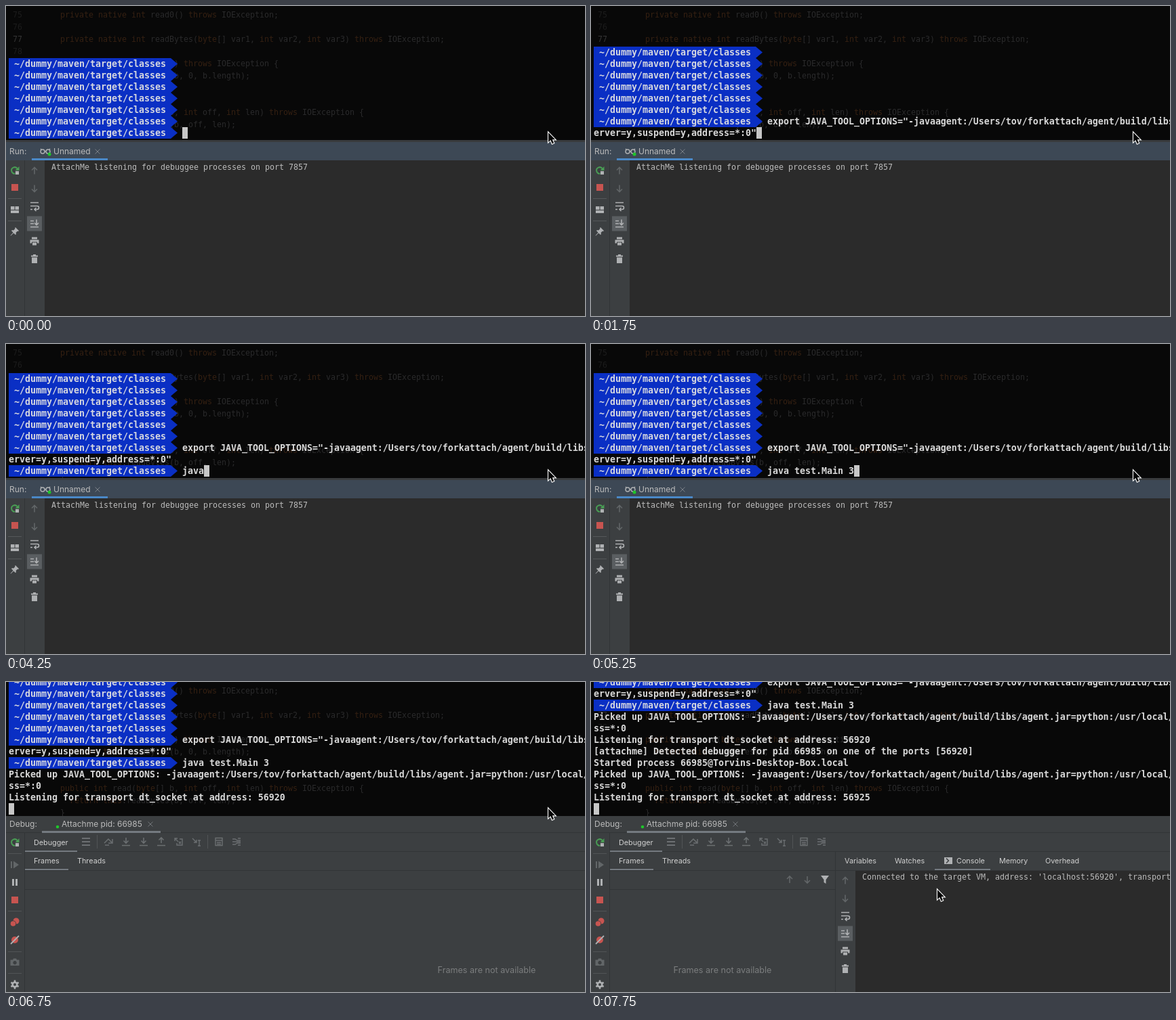
Recreate the animation shown at these times as an HTML page with a canvas. Size 854 by 458 pixels, loop 8000 ms.

```html
<!DOCTYPE html>
<html lang="en">
<head>
<meta charset="utf-8">
<title>Debugger attach</title>
<style>
html, body { margin: 0; width: 100%; height: 100%; overflow: hidden; background: #2b2b2b; }
canvas { display: block; }
</style>
</head>
<body>
<canvas id="stage" width="854" height="458"></canvas>
<script>
const ctx = document.getElementById('stage').getContext('2d');
const LOOP = 8000, ROW = 17, LAST_ROW = 179, CHAR = 8;
const MONO = '"DejaVu Sans Mono", monospace', UI = 'Inter, sans-serif';
const PANEL = '#3c3f41', CONSOLE = '#2b2b2b', LINE = '#323537', ICON = '#afb1b3',
      DIM = '#626668', GREEN = '#499c54', RED = '#c75450', LABEL = '#bbbbbb';

function rect(x, y, w, h, color) {
  ctx.fillStyle = color;
  ctx.fillRect(x, y, w, h);
}

function text(str, x, y, color, font, align = 'left') {
  ctx.font = font;
  ctx.fillStyle = color;
  ctx.textAlign = align;
  ctx.fillText(str, x, y);
}

const header = (str, x, y) => text(str, x, y + 4.3, LABEL, '12px ' + UI);
const tab = (str, x, y) => text(str, x, y + 4, '#d0d0d0', '10.8px ' + UI);
const log = (str, x, y) => text(str, x, y + 4, '#bbbbbb', '11.63px ' + MONO);

// Icon paths around their own centre: [path, stroke width or 0 for fill]
const ICONS = {
  up: ['M0 5V-5M-4-1L0-5L4-1', 1.6],
  down: ['M0-5V5M-4 1L0 5L4 1', 1.6],
  wrap: ['M-6-5H6M-6 0H4A2.5 2.5 0 0 1 4 5H0M2.5 2.5L0 5L2.5 7.5M-6 5H-3', 1.6],
  scrollEnd: ['M-6-4H-1M-6 0H-1M-6 5H6M3-6V2M0-1L3 2L6-1', 1.6],
  print: ['M-4-6H4V-3H-4ZM-6.5-2H6.5V3H4V1H-4V3H-6.5ZM-3 2H3V6H-3Z', 0],
  trash: ['M-5-5H-2V-6.5H2V-5H5V-3H-5ZM-4-2H4V6.5H-4Z', 0],
  layout: ['M-6-5H-.5V0H-6ZM.5-5H6V0H.5ZM-6 1H6V5H-6Z', 0],
  pin: ['M1-6L6-1L5 0L4-.5L1.5 2L2 4L1 5L-1.8 2.4L-6 6.4L-6.4 6L-2.4 1.8L-5-1L-4-2L-2-1.5L.5-4L0-5Z', 0],
  filter: ['M-6-6H6L1.5 0V6L-1.5 4V0Z', 0],
  resume: ['M-6-5H-4V5H-6ZM-2-5.5L6 0L-2 5.5Z', 0],
  pause: ['M-4-5H-1V5H-4ZM1-5H4V5H1Z', 0],
  camera: ['M-6.5-3.5H-3L-2-5.5H2L3-3.5H6.5V5H-6.5ZM0-2A2.7 2.7 0 1 0 .1-2Z', 0],
  teeth: ['M0-6.5V6.5M-5.6-3.2L5.6 3.2M-5.6 3.2L5.6-3.2', 2.6],
  menu: ['M-6-5H6M-6 0H6M-6 5H6', 1.6],
  over: ['M-6 2L0-4L5 1M6-4V2H0M-5 5H1', 1.5],
  into: ['M0-6V2M-3.5-1.5L0 2L3.5-1.5M-6 5.5H6', 1.6],
  out: ['M0 2V-6M-3.5-2.5L0-6L3.5-2.5M-6 5.5H6', 1.6],
  drop: ['M-6-5L-1 0M-6-1V-5H-2M-3 2V5H5V-4H1M0 0L3 3M3 0L0 3', 1.4],
  toCursor: ['M-6-5L0 1M0-3V1H-4M2-2H6M4-2V6M2 6H6', 1.4],
  calc: ['M-5-5.5H5V5.5H-5ZM-5-2H5M-3 1H3M-3 3.5H3', 1.4],
  trace: ['M-6-4H-2L1-2H6M-6 0H6M-6 4H-2L1 2H6M2-5H6M2 5H6', 1.4],
  glasses: ['M-7-3L-6-4M7-3L6-4M-1 0H1M-7 0A3 3 0 1 0-1 0A3 3 0 1 0-7 0M1 0A3 3 0 1 0 7 0A3 3 0 1 0 1 0', 1.4],
  close: ['M-3.5-3.5L3.5 3.5M3.5-3.5L-3.5 3.5', 1],
  rerun: ['M3.8-2.6A4.7 4.7 0 1 0 .5 4.6', 2],
  rerunHead: ['M6.5-6V0H.5Z', 0],
  prompt: ['M-6-5H6V5H-6ZM-3.5-3L-.5 0L-3.5 3L-2.5 4L1.5 0L-2.5-4Z', 0],
  slash: ['M-6 6L6-6', 1.8],
  pointer: ['M0 0V14L3.3 11L5.6 16.5L8 15.5L5.7 10.3H10Z', 0]
};
for (const key in ICONS) ICONS[key][0] = new Path2D(ICONS[key][0]);

function icon(name, x, y, color = ICON) {
  const [path, width] = ICONS[name];
  ctx.save();
  ctx.translate(x, y);
  ctx.fillStyle = ctx.strokeStyle = color;
  ctx.lineWidth = width;
  if (width) ctx.stroke(path); else ctx.fill(path, 'evenodd');
  ctx.restore();
}

function dot(x, y, r, color) {
  ctx.fillStyle = color;
  ctx.beginPath();
  ctx.arc(x, y, r, 0, 7);
  ctx.fill();
}

function rerun(x, y) {
  icon('rerun', x, y, GREEN);
  icon('rerunHead', x, y, GREEN);
  rect(x + 1, y + 1, 5, 5, ICON);
}

function pointer(x, y) {
  ctx.save();
  ctx.translate(x, y);
  ctx.strokeStyle = '#fff';
  ctx.lineWidth = 2.2;
  ctx.stroke(ICONS.pointer[0]);
  ctx.restore();
  icon('pointer', x, y, '#000');
}

// Faint editor behind the translucent terminal
const CODE = [
  [80, 13, 'private native int read0() throws IOException;'],
  [80, 49, 'private native int readBytes(byte[] var1, int var2, int var3) throws IOException;'],
  [80, 85, 'public int read(byte[] b) throws IOException {'],
  [94, 103, 'return this.readBytes(b, 0, b.length);'],
  [80, 121, '}'],
  [80, 157, 'public int read(byte[] b, int off, int len) throws IOException {'],
  [94, 175, 'return this.readBytes(b, off, len);'],
  [80, 193, '}']
];

function editor() {
  const font = '11.63px ' + MONO;
  rect(0, 0, 854, 198, '#080808');
  for (let i = 0; i < 4; i++)
    text(75 + i, 10, 17 + i * 18, i === 2 ? '#343434' : '#1c1c1c', font);
  for (const [x, y, line] of CODE)
    for (const m of line.matchAll(/\w+|[^\w\s]+/g)) {
      const keyword = /^(private|native|public|int|byte|throws|return|this)$/.test(m[0]);
      text(m[0], x + m.index * 7, y + 4, keyword ? '#352012' : '#2a2a2b', font);
    }
}

const AGENT = '-javaagent:/Users/tov/forkattach/agent/build/libs/agent.jar=python:/usr/local/';
const EXPORT = 'export JAVA_TOOL_OPTIONS="' + AGENT;
const PICKED = ['Picked up JAVA_TOOL_OPTIONS: ' + AGENT, 'ss=*:0'];
const prompt = command => ({ prompt: true, text: command });
const output = line => ({ prompt: false, text: line });

function typed(str, t, steps) {
  let count = 0;
  for (const [start, n] of steps) if (t >= start) count = n;
  return str.slice(0, count);
}

function terminalRows(t) {
  const rows = Array.from({ length: 6 }, () => prompt(''));
  const print = (...lines) => rows.push(...lines.map(output));
  if (t < 1750) {
    rows.push(prompt(typed(EXPORT, t, [[750, 1], [1000, 3], [1250, 4], [1500, 6]])));
    return rows;
  }
  rows.push(prompt(EXPORT));
  print('erver=y,suspend=y,address=*:0"');
  if (t >= 3000) rows.push(prompt(typed('java test.Main 3', t, [[4000, 3], [4250, 4], [5250, 16]])));
  if (t >= 6500) print(...PICKED, 'Listening for transport dt_socket at address: 56920');
  if (t >= 7000) print('[attachme] Detected debugger for pid 66985 on one of the ports [56920]',
    'Started process 66985@Torvins-Desktop-Box.local', ...PICKED);
  if (t >= 7500) print('Listening for transport dt_socket at address: 56925');
  if (t >= 6500) print('');
  return rows;
}

function terminal(t) {
  const rows = terminalRows(t), font = 'bold 13.29px ' + MONO;
  editor();
  rows.forEach((row, i) => {
    const top = LAST_ROW - (rows.length - 1 - i) * ROW;
    const x = row.prompt ? 260 : 4;
    if (row.prompt) {
      ctx.fillStyle = '#0a2fc4';
      ctx.beginPath();
      ctx.moveTo(4, top);
      ctx.lineTo(243, top);
      ctx.lineTo(253, top + ROW / 2);
      ctx.lineTo(243, top + ROW);
      ctx.lineTo(4, top + ROW);
      ctx.fill();
      text('~/dummy/maven/target/classes', 12, top + 13, '#d6d8e0', font);
    }
    text(row.text, x, top + 13, '#d8d8d8', font);
    if (i === rows.length - 1) rect(x + row.text.length * CHAR, top, CHAR, ROW, '#c7c7c7');
  });
}

function consoleTools(x, y) {
  rect(x - 11, y + 67, 22, 22, '#5a5e61');
  ['up', 'down', 'wrap', 'scrollEnd', 'print', 'trash'].forEach((name, i) =>
    icon(name, x, y + i * 26, i < 2 ? DIM : ICON));
}

function runPanel() {
  rect(0, 198, 854, 260, CONSOLE);
  rect(0, 198, 854, 3, '#393b3d');
  rect(0, 201, 854, 27, '#3d4855');
  rect(0, 228, 57, 230, PANEL);
  rect(27, 228, 1, 230, LINE);
  rect(38, 225, 112, 3, '#4a88c7');
  header('Run:', 5, 215);
  icon('glasses', 58, 215);
  dot(64, 219, 2.5, '#1fc52b');
  header('Unnamed', 70, 215);
  icon('close', 135, 215, '#7a8087');
  rerun(13, 243);
  rect(8, 263, 10, 10, RED);
  rect(3, 284, 20, 1, '#55585a');
  icon('layout', 13, 301);
  rect(3, 317, 20, 1, '#55585a');
  icon('pin', 13, 333);
  consoleTools(42, 243.5);
  log('AttachMe listening for debuggee processes on port 7857', 67, 238);
}

function debugSidebar() {
  rerun(13, 237);
  icon('resume', 13, 270, DIM);
  icon('pause', 13, 296);
  rect(8, 317, 10, 10, RED);
  dot(15, 353, 4.5, RED);
  dot(10.5, 357, 4.5, PANEL);
  dot(10.5, 357, 3.8, RED);
  dot(13, 381, 5, RED);
  icon('slash', 13, 381, ICON);
  icon('camera', 13, 414, DIM);
  icon('teeth', 13, 447);
  dot(13, 447, 4.6, ICON);
  dot(13, 447, 2, PANEL);
  icon('filter', 19, 454, 'transparent');
  for (const y of [253, 338, 398, 430]) rect(3, y, 20, 1, '#515456');
}

function debugPanel(t) {
  const split = t >= 7000, right = split ? 360 : 854;
  rect(0, 198, 854, 260, PANEL);
  rect(0, 222, 854, 1, LINE);
  rect(27, 223, 1, 235, LINE);
  header('Debug:', 5, 210);
  dot(76, 214, 2.3, '#1fc52b');
  header('Attachme pid: 66985', 82, 210);
  icon('close', 213, 210, '#72767a');
  rect(53, 220, 175, 3, '#747a80');
  debugSidebar();

  rect(28, 250, 826, 1, LINE);
  rect(28, 278, 826, 1, LINE);
  rect(28, 306, right - 28, 1, LINE);
  tab('Debugger', 41, 237);
  rect(28, 249, 77, 2, '#747a80');
  ['over', 'into', 'into', 'out', 'drop', 'toCursor'].forEach((name, i) =>
    icon(name, 151 + i * 26, 236, '#6b6f71'));
  icon('menu', 118, 236, '#7c8082');
  icon('calc', 314, 236, '#6b6f71');
  icon('trace', 340, 236, '#6b6f71');
  rect(134, 226, 1, 20, '#515456');
  rect(297, 226, 1, 20, '#515456');
  tab('Frames', 41, 264);
  tab('Threads', 105, 264);
  rect(28, 276, 64, 2, '#747a80');
  text('Frames are not available', split ? 194 : 709, 430, '#7b7d7e', '12.6px ' + UI, 'center');
  if (!split) return;

  icon('up', 293, 292, DIM);
  icon('down', 319, 292, DIM);
  icon('filter', 345, 292);
  rect(360, 251, 1, 207, LINE);
  rect(390, 279, 464, 179, CONSOLE);
  tab('Variables', 374, 264);
  tab('Watches', 448, 264);
  icon('prompt', 527, 264);
  tab('Console', 539, 264);
  tab('Memory', 602, 264);
  tab('Overhead', 670, 264);
  rect(507, 276, 82, 2, '#747a80');
  if (t >= 7250) {
    consoleTools(375, 293.5);
    log("Connected to the target VM, address: 'localhost:56920', transport: 'socket'", 400, 288);
  }
}

function draw() {
  const t = performance.now() % LOOP;
  terminal(t);
  if (t < 6750) runPanel(); else debugPanel(t);
  if (t < 7750) pointer(800, 187); else pointer(511, 307);
  requestAnimationFrame(draw);
}
draw();
</script>
</body>
</html>
```
